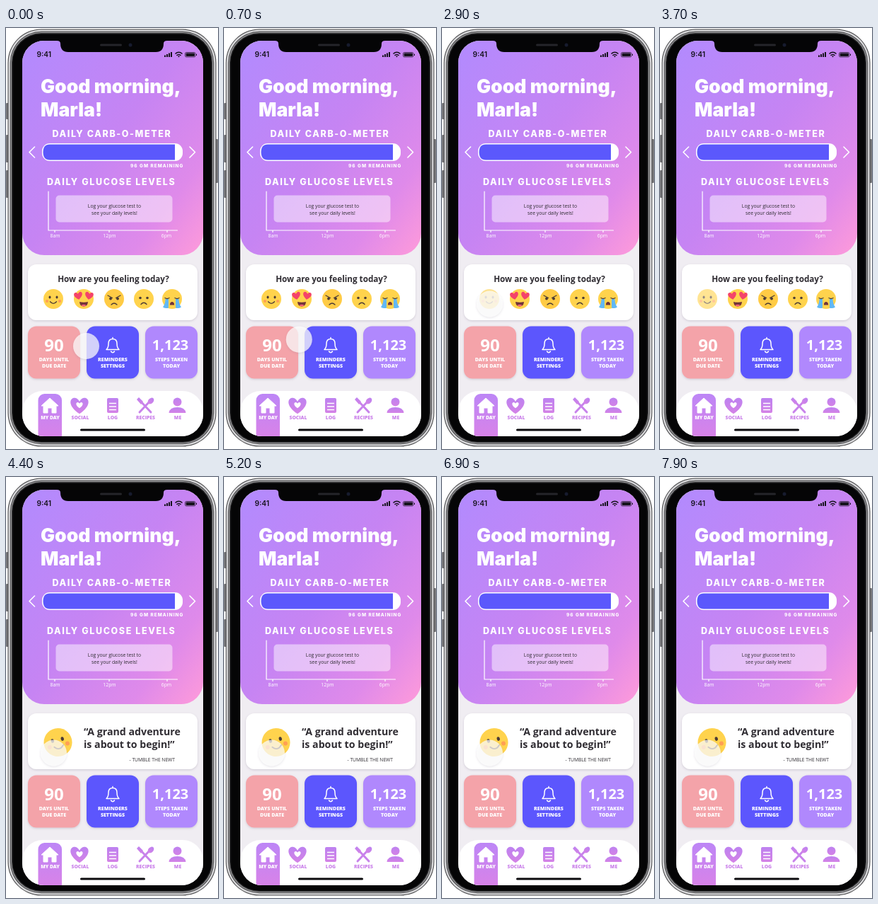
An HTML page for the animation above (8 s loop, 300 by 595 pixels).

```html
<!DOCTYPE html>
<html lang="en">
<head>
<meta charset="utf-8">
<title>Daily health app</title>
<style>
  html, body { margin: 0; width: 100%; height: 100%; overflow: hidden; background: #fff; }
  svg { display: block; width: 300px; height: 595px; }
  text { font-family: "Open Sans", sans-serif; fill: #fff; }
  .head { font-family: Inter, sans-serif; font-weight: 800; }
  .hello { font-weight: 900; font-size: 26.6px; }
  .title { font-size: 12.5px; letter-spacing: 1.62px; }
  .dark { fill: #302d33; }
  .bold { font-weight: 700; }
  .mid { text-anchor: middle; }
  .small { font-size: 6.8px; }
  .label { font-size: 7.1px; font-weight: 800; text-anchor: middle; }
  .line { fill: none; stroke: #fff; stroke-linecap: round; stroke-linejoin: round; }
  .ink { fill: none; stroke: #4b3b35; stroke-width: 1.3; stroke-linecap: round; }
</style>
</head>
<body>
<svg viewBox="0 0 300 595">
  <defs>
    <linearGradient id="sky" x1="0" y1="0" x2="1" y2="1">
      <stop offset="0" stop-color="#b08bff"/>
      <stop offset=".5" stop-color="#c684f3"/>
      <stop offset=".8" stop-color="#df8aea"/>
      <stop offset="1" stop-color="#ff9bda"/>
    </linearGradient>
    <linearGradient id="tab" x2="0" y2="1">
      <stop offset="0" stop-color="#bd86f6"/>
      <stop offset="1" stop-color="#dc82e6"/>
    </linearGradient>
    <linearGradient id="icon" x2="0" y2="1">
      <stop offset="0" stop-color="#bd82f0"/>
      <stop offset="1" stop-color="#d482e6"/>
    </linearGradient>
    <filter id="shadow" x="-30%" y="-30%" width="160%" height="160%">
      <feDropShadow dx="0" dy="1.2" stdDeviation="1.8" flood-color="#655a75" flood-opacity=".24"/>
    </filter>
    <clipPath id="screen"><rect x="23" y="18" width="256" height="559" rx="31"/></clipPath>

    <g id="smile">
      <circle r="14" fill="#ffd34d"/>
      <circle cx="-9" cy="3" r="2.1" fill="#ff9f55"/>
      <circle cx="9" cy="3" r="2.1" fill="#ff9f55"/>
      <ellipse cx="-5" cy="-2.5" rx="1.5" ry="2" fill="#4b3b35"/>
      <ellipse cx="5" cy="-2.5" rx="1.5" ry="2" fill="#4b3b35"/>
      <path class="ink" d="M-4.5 3.8Q0 9 4.5 3.8"/>
    </g>
    <path id="heart" d="M0 5C-9 -1-6.5-6.5-3-6C-1-5.7 0-3.5 0-3.5S1-5.7 3-6C6.5-6.5 9-1 0 5Z"/>
    <g id="love">
      <circle r="14" fill="#ffd34d"/>
      <use href="#heart" transform="translate(-7.5 -4) rotate(-10) scale(.95)" fill="#f4436a"/>
      <use href="#heart" transform="translate(7.5 -4) rotate(10) scale(.95)" fill="#f4436a"/>
      <path d="M-6 4Q0 5.5 6 4Q5.500 10.500 0 10.500T-6 4Z" fill="#703438"/>
      <path d="M-3.500 8.800Q0 6.500 3.500 8.800Q2.500 10.500 0 10.500T-3.500 8.800Z" fill="#f4607a"/>
    </g>
    <g id="angry">
      <circle r="14" fill="#ffcb45"/>
      <path class="ink" stroke-width="1.8" d="M-9-5L-2.500-1.500M9-5L2.500-1.500M-4 8Q0 4 4 8"/>
      <circle cx="-5" cy="-.5" r="1.9" fill="#4b3b35"/>
      <circle cx="5" cy="-.5" r="1.9" fill="#4b3b35"/>
    </g>
    <g id="sad">
      <circle r="14" fill="#ffd34d"/>
      <circle cx="-5" cy="-1.5" r="1.8" fill="#4b3b35"/>
      <circle cx="5" cy="-1.5" r="1.8" fill="#4b3b35"/>
      <path class="ink" d="M-4 7.500Q0 3 4 7.500"/>
    </g>
    <g id="cry">
      <circle r="14" fill="#ffd34d"/>
      <path d="M-9.500 0H-5V12.500Q-9 14-13 11.500Q-9.500 7-9.500 0ZM9.500 0H5V12.500Q9 14 13 11.500Q9.500 7 9.500 0Z" fill="#62b8f5"/>
      <path class="ink" d="M-10-1.500Q-7 .5-4-1.500M10-1.500Q7 .5 4-1.500"/>
      <path d="M-3.200 8.500Q-3 4 0 4T3.200 8.500Z" fill="#703438"/>
    </g>
  </defs>

  <!-- Phone body -->
  <g fill="#77777a">
    <rect y="106" width="4" height="23" rx="1"/>
    <rect y="151" width="4" height="39" rx="1"/>
    <rect y="201" width="4" height="39" rx="1"/>
    <rect x="296" y="157" width="4" height="62" rx="1"/>
  </g>
  <g id="body"></g>

  <g clip-path="url(#screen)">
    <rect x="23" y="18" width="256" height="559" fill="#f0edf2"/>
    <rect x="23" y="-10" width="256" height="331" rx="31" fill="url(#sky)"/>
    <path d="M72 18Q77 18 77 22Q77 34 88 34H212Q223 34 223 22Q223 18 228 18Z" fill="#050506"/>
    <rect x="133" y="22.5" width="31" height="3" rx="1.5" fill="#25252a"/>
    <circle cx="176" cy="24" r="2.5" fill="#171b2e"/>

    <!-- Status bar -->
    <text x="43.5" y="41" style="font:600 10.2px Inter,sans-serif;fill:#16131c">9:41</text>
    <g fill="#16131c">
      <path d="M224 38.5h2v2.500h-2zM227 37h2v4h-2zM230 35.500h2v5.500h-2zM233 34h2v7h-2z"/>
      <g fill="none" stroke="#16131c" stroke-width="1.6">
        <path d="M239.500 36.500Q244.500 32 249.500 36.500M241.500 38.800Q244.500 36.200 247.500 38.800"/>
        <rect x="253.500" y="34.500" width="14.500" height="6.500" rx="1.800" stroke-width=".7"/>
      </g>
      <circle cx="244.500" cy="40.300" r="1"/>
      <rect x="254.600" y="35.600" width="12.300" height="4.300" rx=".9"/>
      <rect x="269" y="36.500" width="1" height="2.500" rx=".5"/>
    </g>

    <!-- Header -->
    <text class="head hello" x="49" y="91.500">Good morning,</text>
    <text class="head hello" x="49" y="124.500">Marla!</text>
    <text class="head title" x="65.500" y="153.500">DAILY CARB-O-METER</text>
    <text class="head title" x="58" y="221.500">DAILY GLUCOSE LEVELS</text>
    <text class="head" x="176" y="197" font-size="6.5" letter-spacing="1">96 GM REMAINING</text>
    <rect x="51" y="163" width="199" height="25" rx="11" fill="#fff"/>
    <path d="M239 164.500V186.500H62Q52.500 186.500 52.500 175.500T62 164.500Z" fill="#5b58fc"/>
    <path class="line" stroke-width="1.6" d="M40.500 168L33 175.500L40.500 183M260 168L267.500 175.500L260 183"/>
    <path class="line" stroke-width="1.2" d="M60 231V286H242.500M69 286V288.500M146 286V288.500M228 286V288.500"/>
    <rect x="70.500" y="236.500" width="165" height="38" rx="5" fill="#fff" fill-opacity=".48"/>
    <g class="small mid">
      <text class="dark" x="153.500" y="253.500">Log your glucose test to</text>
      <text class="dark" x="153.500" y="263.500">see your daily levels!</text>
      <text x="69.500" y="296">8am</text>
      <text x="146.500" y="296">12pm</text>
      <text x="227" y="296">6pm</text>
    </g>

    <!-- Mood card -->
    <rect x="31" y="334" width="240" height="79" rx="12" fill="#fff" filter="url(#shadow)"/>
    <g id="question">
      <text class="dark bold mid" x="152" y="359" font-size="11.7">How are you feeling today?</text>
      <use id="choice" href="#smile" x="67" y="383"/>
      <use href="#love" x="110" y="383"/>
      <use href="#angry" x="153" y="383"/>
      <use href="#sad" x="195" y="383"/>
      <use href="#cry" x="235" y="383"/>
    </g>
    <g id="quote">
      <use href="#smile" transform="translate(73.500 375) rotate(-12) scale(1.43)"/>
      <text class="dark bold" x="110" y="364.500" font-size="14.2">“A grand adventure</text>
      <text class="dark bold" x="110" y="383" font-size="14.2">is about to begin!”</text>
      <text class="dark" x="239" y="401.500" font-size="6.7" text-anchor="end">- TUMBLE THE NEWT</text>
    </g>

    <!-- Tiles -->
    <g filter="url(#shadow)">
      <rect x="31" y="421.500" width="74" height="74" rx="12" fill="#f4a3a9"/>
      <rect x="114" y="421.500" width="74" height="74" rx="12" fill="#5b56fd"/>
      <rect x="197" y="421.500" width="74" height="74" rx="12" fill="#b088fd"/>
    </g>
    <text class="bold mid" x="68" y="457" font-size="24">90</text>
    <text class="bold mid" x="232.500" y="455" font-size="20">1,123</text>
    <path class="line" stroke-width="1.5" d="M142 454.500Q145 452 145 446Q145 439.500 151 439.500T157 446Q157 452 160 454.500ZM151 439.500V437.500M148.500 457Q151 460.500 153.500 457"/>
    <g class="label">
      <text x="68" y="471">DAYS UNTIL</text><text x="68" y="480">DUE DATE</text>
      <text x="151" y="471">REMINDERS</text><text x="151" y="480">SETTINGS</text>
      <text x="234" y="471">STEPS TAKEN</text><text x="234" y="480">TODAY</text>
    </g>

    <!-- Tab bar -->
    <rect x="23" y="513" width="256" height="90" rx="29" fill="#fff"/>
    <rect x="45.500" y="517" width="33.500" height="70" rx="9" fill="url(#tab)"/>
    <path d="M62 523L74 534H71V544H65V537H59V544H53V534H50Z" fill="#fff" stroke="#fff" stroke-linejoin="round"/>
    <g fill="url(#icon)">
      <use href="#heart" transform="translate(104 535) scale(2.05)"/>
      <use href="#heart" transform="translate(104 533.500) scale(.75)" fill="#fff"/>
      <rect x="143" y="523" width="16" height="21" rx="2"/>
      <path d="M146 530.500h10M146 535h10M146 539.500h10" stroke="#fff" stroke-width="1.500"/>
      <path d="M189 526L205 543M205 526L189 543" stroke="#c882eb" stroke-width="3" stroke-linecap="round"/>
      <ellipse cx="205" cy="527" rx="3.600" ry="5" transform="rotate(43 205 527)"/>
      <path d="M185 525L188 522L194 528L191 532Z"/>
      <circle cx="242.500" cy="528.500" r="6"/>
      <path d="M230.500 544Q231.500 536 242.500 536T254.500 544Z"/>
    </g>
    <g class="label" id="tabs"></g>
    <rect x="105" y="566.500" width="92" height="3" rx="1.500" fill="#0b0a0d"/>

    <circle id="touch" r="18.500" fill="#fff" fill-opacity=".7" filter="url(#shadow)"/>
  </g>
</svg>
<script>
  const LOOP = 8000;
  const byId = id => document.getElementById(id);
  const [choice, question, quote, touch] = ["choice", "question", "quote", "touch"].map(byId);
  const ramp = (t, from, to) => Math.min(1, Math.max(0, (t - from) / (to - from)));
  const ease = p => p < .5 ? 2 * p * p : 1 - 2 * (1 - p) ** 2;
  const mix = (a, b, p) => a + (b - a) * p;

  // Metal rim: nested rounded rectangles from the outside in
  const rim = { "#414143": 2.5, "#d9d9db": 3.5, "#4c4c4e": 5.8, "#a6a6a8": 7, "#2c2c2e": 8, "#050506": 9.5 };
  byId("body").innerHTML = Object.entries(rim).map(([fill, d]) =>
    `<rect x="${d}" y="${d - 1}" width="${300 - 2 * d}" height="${595 - 2 * d}" rx="${50 - d}" fill="${fill}"/>`).join("");

  const tabs = { "MY DAY": 62.5, SOCIAL: 105, LOG: 151, RECIPES: 197.5, ME: 243 };
  byId("tabs").innerHTML = Object.entries(tabs).map(([name, x], i) =>
    `<text x="${x}" y="552.5" style="font-size:6.8px;fill:${i ? "#cb82ea" : "#fff"}">${name}</text>`).join("");

  function draw(t) {
    const move = ease(ramp(t, 0, 2500));
    const swap = ease(ramp(t, 4000, 4300));
    const x = mix(113.5, 67.5, move), y = mix(449.5, 390, move);
    touch.setAttribute("transform", `translate(${x} ${y})`);
    touch.setAttribute("opacity", t < 4000 ? 1 - ramp(t, 3200, 3500) : swap);
    choice.setAttribute("opacity", mix(1, .6, ramp(t, 2500, 2800)));
    question.setAttribute("opacity", 1 - swap);
    quote.setAttribute("opacity", swap);
  }

  const start = performance.now();
  function tick() {
    draw((performance.now() - start) % LOOP);
    requestAnimationFrame(tick);
  }
  tick();
</script>
</body>
</html>
```
